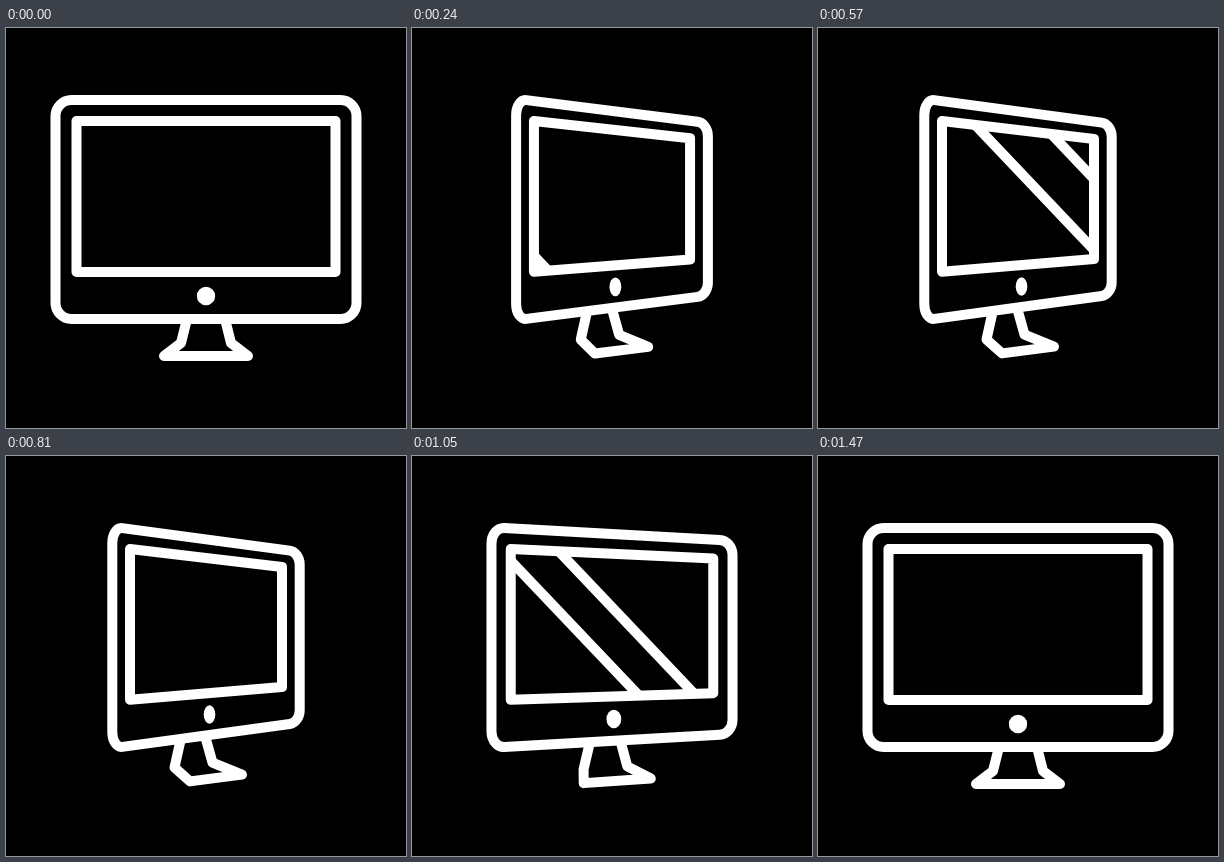
An HTML page with a canvas that plays this animation: 400x400 px, repeating every 2.12 s.

```html
<!DOCTYPE html>
<html lang="en">
<head>
<meta charset="utf-8">
<title>Turning monitor</title>
<style>
  html, body { margin: 0; height: 100%; overflow: hidden; background: #000; }
  canvas { display: block; width: 100vw; height: 100vh; }
</style>
</head>
<body>
<canvas id="stage" width="400" height="400"></canvas>
<script>
const ctx = document.getElementById('stage').getContext('2d');
const LOOP = 2120, STEP = 30, LAST_STEP = 49;
const TURN = 288, RETURN_START = 910;
const CENTER = 200;

// half: width from the centre, front and turned
// top, bottom: height in front, then turned at the left and right edge
const CASE = { half: [150.5, 93.7], top: [72, 70.8, 96], bottom: [291, 292.2, 266.6] };
const SCREEN = { half: [129.5, 76], top: [93, 93, 111], bottom: [244, 243.7, 231] };

// Neck, knee and foot; shift: sideways move when turned
const STAND = [
  { y: 291, half: [19, 13], shift: -13 },
  { y: 315, half: [25, 19], shift: -12.5 },
  { y: 328, half: [42, 26], shift: 10 }
];
const STAND_LIFT = 6, STAND_TILT = 0.13;

const mix = (a, b, k) => a + (b - a) * k;
const mixPoint = (a, b, k) => [mix(a[0], b[0], k), mix(a[1], b[1], k)];

function ease(u) {
  u = Math.min(1, Math.max(0, u));
  return u * u / (u * u + (1 - u) * (1 - u));
}

function panel({ half, top, bottom }, k) {
  const w = mix(...half, k);
  const corner = (edge, side) => [CENTER + side * w, mix(edge[0], edge[side < 0 ? 1 : 2], k)];
  return [corner(top, -1), corner(top, 1), corner(bottom, 1), corner(bottom, -1)];
}

function stand(k) {
  const leg = side => STAND.map(({ y, half, shift }) => {
    const dx = side * mix(...half, k);
    return [CENTER + shift * k + dx, y - (STAND_LIFT + STAND_TILT * dx) * k];
  });
  return [...leg(-1), ...leg(1).reverse()];
}

function trace(points, closed) {
  ctx.beginPath();
  points.forEach(p => ctx.lineTo(...p));
  if (closed) ctx.closePath();
}

function traceRounded(quad) {
  const BEND = 0.55, ALONG_X = 0.053, ALONG_Y = 0.073;
  ctx.beginPath();
  quad.forEach((corner, i) => {
    const [rIn, rOut] = i % 2 ? [ALONG_X, ALONG_Y] : [ALONG_Y, ALONG_X];
    const start = mixPoint(corner, quad[(i + 3) % 4], rIn);
    const end = mixPoint(corner, quad[(i + 1) % 4], rOut);
    ctx.lineTo(...start);
    ctx.bezierCurveTo(...mixPoint(start, corner, BEND), ...mixPoint(end, corner, BEND), ...end);
  });
  ctx.closePath();
}

// Two diagonal glints sweep over the screen, once per turn, slowing down
function drawShine(n, screen) {
  const { at, x, gap } = n < 27 ? { at: 13, x: 176, gap: 67.5 } : { at: 38, x: 279.2, gap: 57 };
  const d = n - at;
  const lead = x + 21 * d - 0.35 * d * d;
  ctx.save();
  trace(screen, true);
  ctx.clip();
  for (const mid of [lead, lead - gap]) {
    trace([[mid - 95, 65], [mid + 95, 265]]);
    ctx.stroke();
  }
  ctx.restore();
}

function draw(time) {
  const n = Math.min(LAST_STEP, Math.floor(time % LOOP / STEP));
  const t = n * STEP;
  const k = ease(t / TURN) - ease((t - RETURN_START) / TURN);
  const screen = panel(SCREEN, k);

  ctx.fillStyle = '#000';
  ctx.fillRect(0, 0, 400, 400);
  ctx.fillStyle = ctx.strokeStyle = '#fff';
  ctx.lineWidth = 10;
  ctx.lineJoin = ctx.lineCap = 'round';

  drawShine(n, screen);
  trace(screen, true);
  ctx.stroke();
  traceRounded(panel(CASE, k));
  ctx.stroke();
  trace(stand(k));
  ctx.stroke();

  ctx.beginPath();
  ctx.ellipse(CENTER + 3.5 * k, mix(268, 258.5, k), mix(9.2, 5.8, k), 9.3, 0, 0, 2 * Math.PI);
  ctx.fill();
}

const begin = performance.now();
function tick() {
  draw(performance.now() - begin);
  requestAnimationFrame(tick);
}
tick();
</script>
</body>
</html>
```
